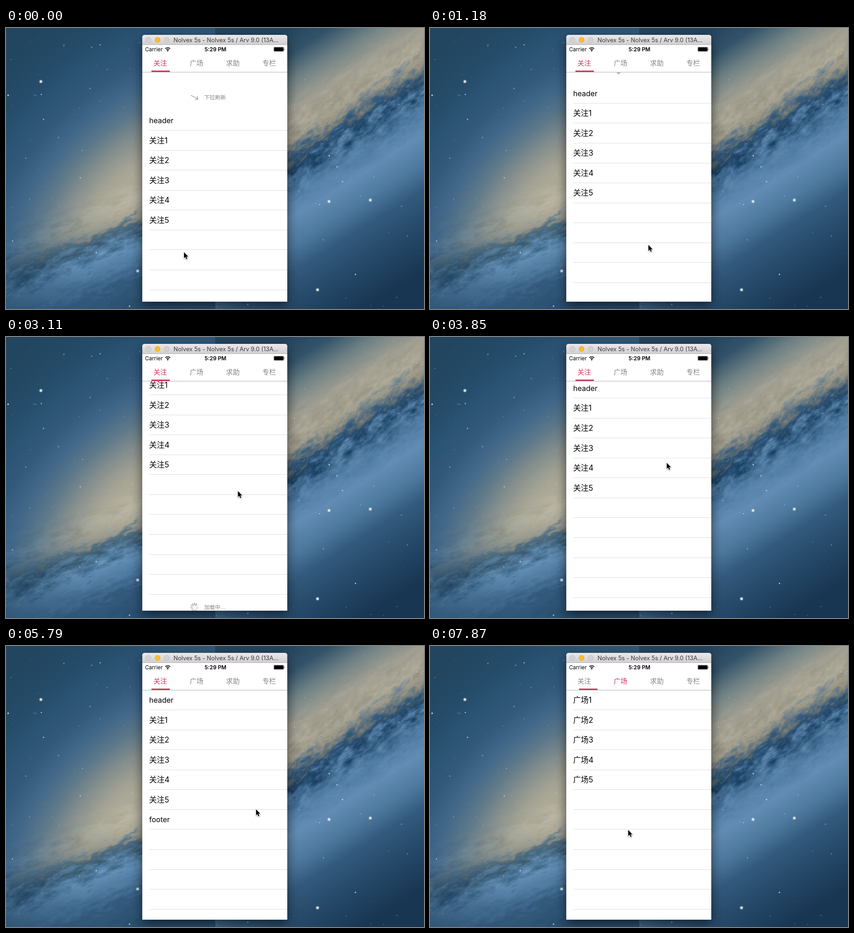
Recreate the animation shown at these times as an HTML page with a canvas. Size 911 by 614 pixels, loop 8000 ms.

```html
<!DOCTYPE html>
<html lang="zh">
<head>
<meta charset="utf-8">
<style>
  html, body { margin: 0; width: 100%; height: 100%; overflow: hidden; background: #25496a; }
  canvas { display: block; }
</style>
</head>
<body>
<canvas id="stage" width="911" height="614"></canvas>
<script>
const W = 911, H = 614, LOOP = 8000, TICK = 148.5;
const ROW = 43.55, LEFT = 297, WIDTH = 316, TOP = 97, BOTTOM = 598;
const FONT = 'Inter, "Noto Sans CJK SC", "Noto Sans CJK", sans-serif';
const RED = '#d4365c', GRAY = '#858585';
const TABS = ['关注', '广场', '求助', '专栏'];
const ctx = document.getElementById('stage').getContext('2d');

let seed = 11;
const random = () => (seed = seed * 16807 % 2147483647) / 2147483647;
const clamp = v => Math.max(0, Math.min(1, v));
const mix = (a, b, p) => a + (b - a) * p;
const easeOut = p => 1 - (1 - clamp(p)) ** 2;
const bell = v => Math.exp(-v * v);

function dot(c, x, y, r, color) {
  c.fillStyle = color;
  c.beginPath();
  c.arc(x, y, r, 0, 7);
  c.fill();
}

function text(str, x, y, size, color = '#000', align = 'left', weight = 400) {
  ctx.font = `${weight} ${size}px ${FONT}`;
  ctx.fillStyle = color;
  ctx.textAlign = align;
  ctx.fillText(str, x, y);
}

// Evenly spaced colours, looked up by position.
function ramp(step, hexes) {
  const colors = hexes.split(' ').map(h => [0, 2, 4].map(i => parseInt(h.substr(i, 2), 16)));
  return v => {
    const p = Math.max(0, Math.min(colors.length - 1.001, v / step)), i = Math.floor(p);
    return colors[i].map((a, n) => mix(a, colors[i + 1][n], p - i));
  };
}

const lattice = Array.from({ length: 4096 }, random);

function noise(x, y) {
  const i = Math.floor(x), j = Math.floor(y), s = x - i, t = y - j;
  const at = (a, b) => lattice[(a & 63) + (b & 63) * 64];
  return mix(mix(at(i, j), at(i + 1, j), s), mix(at(i, j + 1), at(i + 1, j + 1), s), t);
}

const clouds = (x, y) => (noise(x, y) * 4 + noise(x * 2.3, y * 2.3) * 3 + noise(x * 5, y * 5) * 2) / 9 - .5;

const core = ramp(45, 'b8b3a0 b5b09d a6a595 868f8d 5d788a 416789 33597a 2b5373 254c69 234864 22465f');
const arm = ramp(30, '8c9490 466479 4d7799 5b86ac 456e93 32587a 2f5576 294e6e');
const disc = ramp(60, '23445e 33536a 6f8184 9f9e91 aaa593 23496c 4d789f 628cb3 4f7aa0 335a7d 284c6c 1f4160 183551');

// Left: round glow cut off by a tilted arm. Right: parallel tilted bands.
function skyColor(x, y) {
  if (x > LEFT + WIDTH / 2) {
    const v = y + .63 * (x - 613), n = clouds(x / 24, v / 16);
    const color = disc(v + n * 130 * bell((v - 290) / 75));
    return color.map(c => c + n * 75 * bell((v - 285) / 85));
  }
  const dx = x - 300, dy = y - 395, d = y + .37 * x - 505, n = clouds(x / 26, d / 11);
  const glow = core(Math.hypot((dx - dy) / 2.26, (dx + dy) / 1.414));
  const lane = arm(d + n * 70), shade = .7 * clamp(1 - x / 170);
  const below = clamp((d + n * 80 + 15) / 35);
  return glow.map((g, i) =>
    mix(g, mix(lane[i], [36, 72, 102][i], shade), below) + n * 65 * bell((d - 35) / 75));
}

function makeSky() {
  const sky = document.createElement('canvas');
  sky.width = W;
  sky.height = H;
  const c = sky.getContext('2d'), image = c.createImageData(W, H);
  for (let y = 0; y < H; y++)
    for (let x = 0; x < W; x++)
      image.data.set([...skyColor(x, y), 255], (y * W + x) * 4);
  c.putImageData(image, 0, 0);

  for (let i = 0; i < 650; i++) {
    c.globalAlpha = .15 + random() ** 3 * .75;
    dot(c, random() * W, random() * H, .4 + random() ** 6 * 1.5, '#d5e7f4');
  }
  c.globalAlpha = 1;
  for (const [x, y] of [[76, 117], [679, 572], [794, 376], [704, 379], [287, 531]]) {
    dot(c, x, y, 4.5, '#b8d4e940');
    dot(c, x, y, 2.7, '#dce6e7');
  }
  c.shadowColor = '#0009';
  c.shadowBlur = 24;
  c.shadowOffsetY = 8;
  c.fillStyle = '#fff';
  c.fillRect(LEFT, 18, WIDTH, BOTTOM - 18);
  return sky;
}

const sky = makeSky();

// Drags of the list: start, release, distance. A released list springs back.
const PULLS = [[-1, 0, 84], [1036, 1500, 45], [2850, 3410, -77.6], [4180, 4600, -95]];
// Pointer moves: start, end, x, y.
const MOVES = [[0, 900, 476, 429], [1036, 1500, 476, 511], [2850, 3400, 516, 275],
  [4180, 4600, 540, 19], [4850, 5790, 545, 357], [5945, 6200, 385, 357],
  [6560, 6970, 544, 384], [7130, 7573, 278, 404], [7573, 7870, 432, 402]];

function scrollAt(t) {
  const [start, release, far] = PULLS.filter(p => p[0] <= t).pop();
  const v = t < release
    ? far * easeOut((t - start) / (release - start))
    : far * Math.exp((release - t) * .00565);
  return Math.abs(v) < .3 ? 0 : v;
}

const pointerAt = t => MOVES.reduce(([x, y], [start, end, toX, toY]) => {
  const p = easeOut((t - start) / (end - start));
  return [mix(x, toX, p), mix(y, toY, p)];
}, [388, 490]);

function drawWindow(second) {
  const bar = ctx.createLinearGradient(0, 15, 0, 37);
  bar.addColorStop(0, '#ebe9eb');
  bar.addColorStop(1, '#d0ced0');
  ctx.fillStyle = bar;
  ctx.beginPath();
  ctx.roundRect(LEFT, 15, WIDTH, 22, [5, 5, 0, 0]);
  ctx.fill();
  ctx.fillStyle = '#b3b1b3';
  ctx.fillRect(LEFT, 36, WIDTH, 1);
  for (let i = 0; i < 3; i++) {
    dot(ctx, 310.5 + i * 19.8, 26, 6, i === 1 ? '#dfa023' : '#bbb9bb');
    dot(ctx, 310.5 + i * 19.8, 26, 5.2, i === 1 ? '#fdbc2e' : '#d3d1d3');
  }
  text('Nolvex 5s - Nolvex 5s / Arv 9.0 (13A...', 365, 31, 12.8, '#3c3c3c');

  ctx.fillStyle = '#fff';
  ctx.fillRect(LEFT, 37, WIDTH, 60);
  text('Carrier', 303, 51, 11.8);
  text('5:29 PM', 456.5, 51, 11.8, '#000', 'center', 600);
  ctx.strokeStyle = '#000';
  ctx.lineWidth = 1.7;
  for (const r of [4.6, 8]) {
    ctx.beginPath();
    ctx.arc(352.5, 51, r, -2.3, -.84);
    ctx.stroke();
  }
  dot(ctx, 352.5, 49.6, 1.5, '#000');
  ctx.fillStyle = '#777';
  ctx.beginPath();
  ctx.roundRect(583.5, 41.5, 22, 10, 2);
  ctx.roundRect(606, 45, 1.5, 3.5, .7);
  ctx.fill();
  ctx.fillStyle = '#000';
  ctx.fillRect(584.5, 42.5, 20, 8);

  TABS.forEach((name, i) =>
    text(name, 336 + i * 79.2, 81.7, 14.8, i === +second ? RED : GRAY, 'center'));
  ctx.fillStyle = '#b2b2b2';
  ctx.fillRect(LEFT, 96, WIDTH, 1);
  ctx.fillStyle = RED;
  ctx.fillRect(second ? 325 : 317, 93, 40, 3);
}

function drawList(rows, x, scroll) {
  for (let i = 0; i < 13; i++) {
    ctx.fillStyle = '#dddde0';
    ctx.fillRect(x + 15, Math.round(139.2 + i * ROW + scroll), WIDTH - 15, 1);
    if (rows[i]) text(rows[i], x + 15, 124 + i * ROW + scroll, /[a-z]/.test(rows[i]) ? 16 : 16.8);
  }
}

function drawRefresh(x, y, t) {
  ctx.save();
  ctx.translate(x + 114, y);
  ctx.rotate(mix(.49, Math.PI / 2, clamp(t / 200)));
  ctx.strokeStyle = '#a2a2a2';
  ctx.lineWidth = 1.5;
  ctx.stroke(new Path2D('M-9 0H8M3.5-4.5 8.5 0 3.5 4.5'));
  ctx.restore();
  text('下拉刷新', x + 135, y + 4.5, 11.8, GRAY);
}

function drawLoader(x, y, t) {
  ctx.save();
  ctx.translate(x + 114, y);
  ctx.lineWidth = 1.6;
  ctx.lineCap = 'round';
  const lead = Math.floor(t * .012);
  for (let i = 0; i < 12; i++) {
    ctx.strokeStyle = `rgba(90,90,95,${.75 - (lead + 12 - i) % 12 * .05})`;
    ctx.stroke(new Path2D('M0-5V-9'));
    ctx.rotate(Math.PI / 6);
  }
  ctx.restore();
  text('加载中...', x + 135, y + 5, 11.8, GRAY);
}

const arrow = new Path2D('M0 0V13L3 10.3 5.1 15.2 7.2 14.3 5.1 9.5H9.2Z');

function drawPointer(x, y) {
  ctx.save();
  ctx.translate(x, y);
  ctx.shadowColor = '#0006';
  ctx.shadowBlur = 3;
  ctx.shadowOffsetY = 1;
  ctx.strokeStyle = '#fff';
  ctx.lineWidth = 1.6;
  ctx.stroke(arrow);
  ctx.shadowColor = 'transparent';
  ctx.fillStyle = '#000';
  ctx.fill(arrow);
  ctx.restore();
}

const numbered = name => [1, 2, 3, 4, 5].map(n => name + n);

function draw(t) {
  const scroll = scrollAt(t), loaded = t > 4100;
  const x = LEFT - WIDTH * easeOut((t - 7130) / 650);
  ctx.drawImage(sky, 0, 0);
  ctx.save();
  ctx.beginPath();
  ctx.rect(LEFT, TOP, WIDTH, BOTTOM - TOP);
  ctx.clip();
  ctx.fillStyle = '#fff';
  ctx.fillRect(LEFT, TOP, WIDTH, BOTTOM - TOP);
  drawList(['header', ...numbered(TABS[0]), loaded ? 'footer' : ''], x, scroll);
  drawList(numbered(TABS[1]), x + WIDTH, 0);
  if (scroll > 0) drawRefresh(x, 67.3 + scroll, t);
  if (scroll < 0 && !loaded) drawLoader(x, 647 + scroll, t);
  ctx.restore();
  drawWindow(t > 7800);
  drawPointer(...pointerAt(t));
}

function frame() {
  const t = performance.now() % LOOP;
  draw(Math.floor((t + 12) / TICK) * TICK);
  requestAnimationFrame(frame);
}
frame();
</script>
</body>
</html>
```
